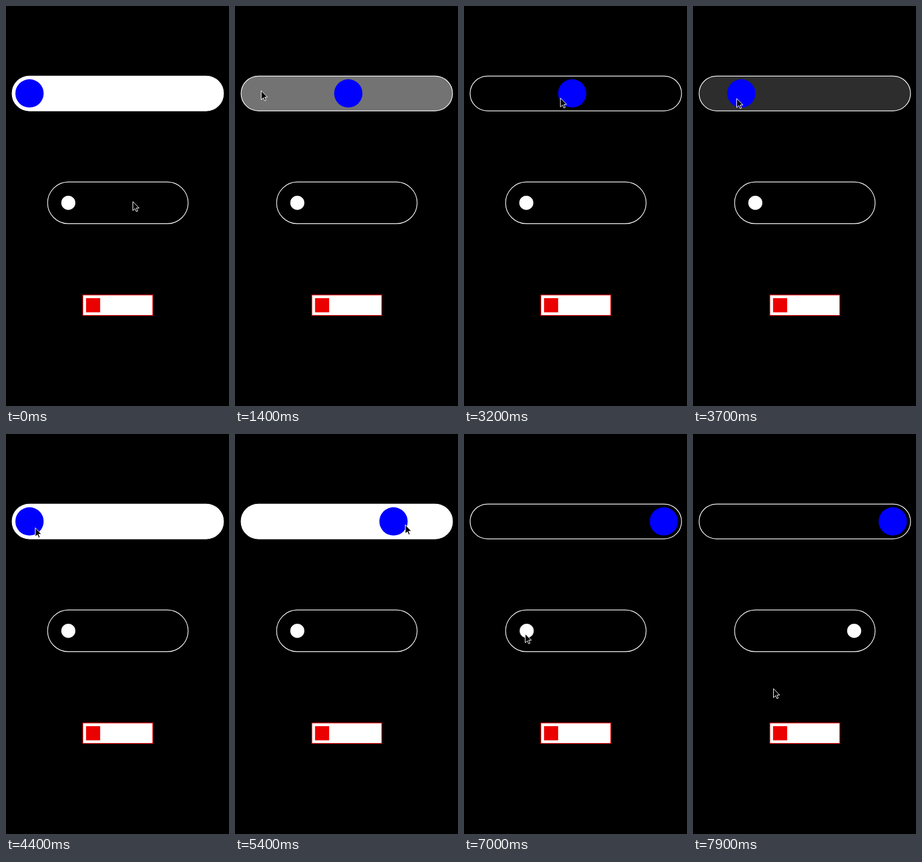
An HTML page that plays this animation: 370 by 664 pixels, repeating every 8 s.

```html
<!DOCTYPE html>
<html lang="en">
<head>
<meta charset="utf-8">
<title>Toggle switches</title>
<style>
  html, body { margin: 0; width: 100%; height: 100%; overflow: hidden; background: #000; }
  svg { display: block; width: 370px; height: 664px; }

  .track, .knob, .dot, .cursor { animation: 8s linear infinite; }
  .track { animation-name: track; }
  .knob { animation-name: knob; }
  .dot { animation-name: dot; }
  .cursor { animation-name: cursor; }

  @keyframes track {
    0% { fill: #fff; }
    13.88% { fill: #fff; animation-timing-function: ease-in-out; }
    20.75%, 44.25% { fill: #000; animation-timing-function: ease-in-out; }
    51.13% { fill: #fff; }
    67.5% { fill: #fff; animation-timing-function: ease-in-out; }
    74%, 100% { fill: #000; }
  }

  /* click on, drag back, drag on again */
  @keyframes knob {
    0% { transform: none; }
    14.04% { transform: none; animation-timing-function: ease-in-out; }
    20.91% { transform: translateX(292.5px); }
    30.63% { transform: translateX(292.5px); animation-timing-function: cubic-bezier(.4, 0, .8, .8); }
    40% { transform: translateX(141px); animation-timing-function: cubic-bezier(.2, .4, .6, 1); }
    44.25% { transform: translateX(50px); animation-timing-function: ease-in-out; }
    51.13% { transform: none; }
    59.38% { transform: none; animation-timing-function: cubic-bezier(.4, 0, .8, .8); }
    67.5% { transform: translateX(224px); animation-timing-function: ease-in-out; }
    74.2%, 100% { transform: translateX(292.5px); }
  }

  @keyframes dot {
    0% { transform: none; }
    87.2% { transform: none; animation-timing-function: ease-in-out; }
    94.6%, 100% { transform: translateX(164px); }
  }

  @keyframes cursor {
    0%, .4% { transform: translate(210px, 324px); }
    3.75%, 5.3% { transform: translate(120px, 215px); }
    9% { transform: translate(62px, 110px); }
    12.5%, 22.9% { transform: translate(43px, 140px); }
    26% { transform: translate(190px, 121px); }
    28.75% { transform: translate(322px, 150px); }
    30.63% { transform: translate(322px, 150px); animation-timing-function: cubic-bezier(.4, 0, .8, .8); }
    40% { transform: translate(160px, 152px); animation-timing-function: cubic-bezier(.2, .4, .6, 1); }
    44.25%, 52.6% { transform: translate(72px, 153px); }
    55% { transform: translate(48px, 155px); }
    57.5% { transform: translate(48px, 156px); }
    59.38% { transform: translate(48px, 156px); animation-timing-function: cubic-bezier(.4, 0, .8, .8); }
    67.5% { transform: translate(282px, 150px); }
    73.75% { transform: translate(257px, 180px); }
    81.25% { transform: translate(102px, 330px); }
    82.5%, 96.25% { transform: translate(101px, 331px); }
    98.75%, 100% { transform: translate(133px, 422px); }
  }
</style>
</head>
<body>
<svg viewBox="0 0 370 664">
  <rect class="track" x="10.1" y="116.3" width="350.8" height="57.8" rx="28.9" stroke="#fff" stroke-width="1.2"/>
  <circle class="knob" cx="39" cy="145.1" r="23.5" fill="#00f"/>

  <rect x="69" y="292.2" width="233.2" height="69.2" rx="34.6" stroke="#fff" stroke-width="1.2"/>
  <circle class="dot" cx="103.4" cy="326.8" r="11.7" fill="#fff"/>

  <rect x="127.5" y="479.7" width="116" height="34" fill="#fff" stroke="#eb0000" stroke-width="1.2"/>
  <rect x="132.8" y="485" width="23.4" height="23.5" fill="#eb0000"/>

  <path class="cursor" d="M.5 .7V15.6L4 12.3 6.2 17.3 8.5 16.3 6.3 11.3H10.8Z" stroke="#fff"/>
</svg>
</body>
</html>
```
